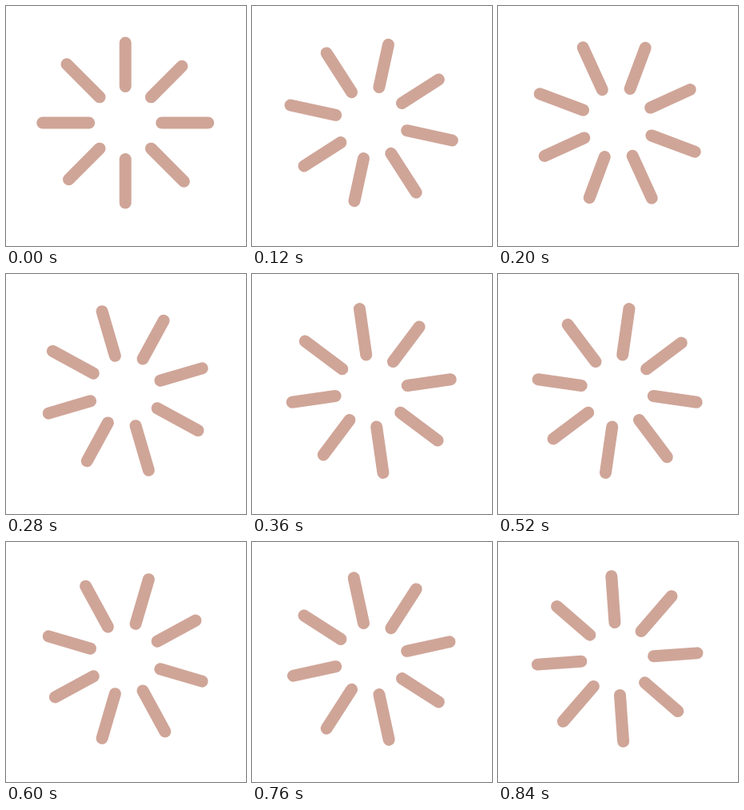
An HTML page that plays this animation: 300x300 px, repeating every 0.88 s.

```html
<!DOCTYPE html>
<html lang="en">
<head>
<meta charset="utf-8">
<title>Spinner</title>
<style>
  html, body { margin: 0; height: 100%; overflow: hidden; background: #fff; }
  svg { display: block; width: 100%; height: 100%; }
  path { stroke: #cfa598; stroke-width: 15; stroke-linecap: round; }
</style>
</head>
<body>
<svg viewBox="0 0 300 300"><g id="rays"></g></svg>
<script>
  const STEP = 40, STEPS = 22, TURN = 90;
  const CENTER = '149.2 146', INNER = 45.5, LONG = 103.5, SHORT = 100;
  const rays = document.getElementById('rays');

  // Rays alternate in pairs: two long, two short.
  rays.innerHTML = Array.from({ length: 8 }, (_, i) =>
    `<path d="M${INNER} 0H${i % 4 < 2 ? LONG : SHORT}" transform="rotate(${i * 45})"/>`
  ).join('');

  function draw() {
    const step = Math.floor(performance.now() / STEP) % STEPS;
    rays.setAttribute('transform', `translate(${CENTER}) rotate(${step * TURN / STEPS})`);
    requestAnimationFrame(draw);
  }
  draw();
</script>
</body>
</html>
```
